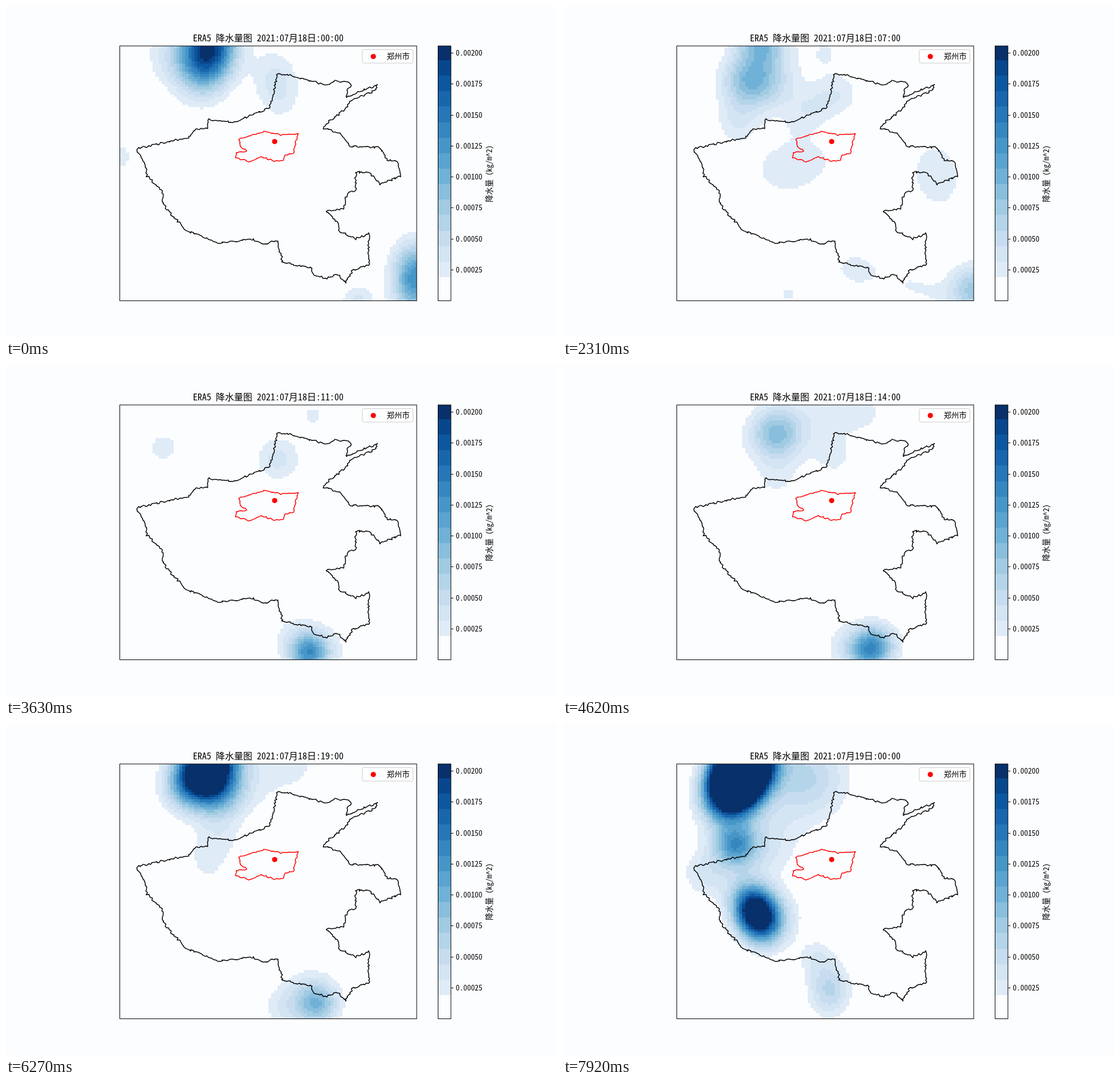
Write an HTML page with a canvas that moves like this. It is 966 by 580 pixels and loops after 8 s.

```html
<!DOCTYPE html>
<html lang="zh">
<head>
<meta charset="utf-8">
<title>ERA5 降水量图</title>
<style>
  html, body { margin: 0; width: 100%; height: 100%; overflow: hidden; background: #fcfdff; }
  canvas, svg { position: absolute; left: 0; top: 0; width: 966px; height: 580px; }
  text { font: 13.33px "Noto Sans Mono CJK SC", "Noto Sans CJK SC", "Noto Sans CJK", monospace; white-space: pre; }
  #title { font-size: 16px; }
  .mid { text-anchor: middle; }
  .frame { fill: none; stroke: #000; stroke-width: 1; }
  .border { fill: none; stroke-width: 1.5; stroke-linejoin: round; }
</style>
</head>
<body>
<canvas id="rain" width="966" height="580"></canvas>
<svg viewBox="0 0 966 580">
  <path id="province" class="border" stroke="#000"/>
  <path id="city" class="border" stroke="#f00"/>
  <circle cx="471" cy="237.5" r="4.6" fill="#f00"/>
  <rect class="frame" x="199.5" y="70" width="520.5" height="446.5"/>
  <rect class="frame" x="757.5" y="70" width="22.5" height="446.5"/>
  <rect x="624.5" y="76.5" width="89" height="23.5" rx="2.7" fill="#fff" fill-opacity=".8" stroke="#ccc"/>
  <circle cx="644" cy="88.5" r="4.6" fill="#f00"/>
  <text x="667.5" y="93">郑州市</text>
  <text id="title" class="mid" x="459.7" y="62"></text>
  <text class="mid" transform="translate(852 294) rotate(-90)">降水量 (kg/m^2)</text>
  <g id="ticks"></g>
</svg>
<script>
const $ = id => document.getElementById(id);
const ctx = $('rain').getContext('2d');
const STEP = 330, LOOP = 8000;
const MAP = { x: 200, y: 70, w: 520, h: 446, n: 100 };

// Colour bar: equal bands above a dry threshold; unit = 0.001 kg/m^2
const BAR = { base: 516.3, unit: 217.1, dry: 475, band: 27.14, count: 15 };
const BLUES = ['f7fbff', 'deebf7', 'c6dbef', '9ecae1', '6baed6', '4292c6', '2171b5', '08519c', '08306b']
  .map(hex => [0, 2, 4].map(i => parseInt(hex.slice(i, i + 2), 16)));

function blues(t) {
  const p = Math.min(t, 0.9999) * 8, i = Math.floor(p), f = p - i;
  return `rgb(${BLUES[i].map((c, k) => Math.round(c + (BLUES[i + 1][k] - c) * f))})`;
}

const bandTop = i => Math.max(MAP.y, BAR.dry - (i + 1) * BAR.band);
const colors = Array.from({ length: BAR.count }, (_, i) =>
  i === BAR.count - 1 ? blues(1) : blues((516 - bandTop(i) - BAR.band / 2) / MAP.h));

function colorOf(value) {
  const i = Math.floor((BAR.dry - BAR.base + value * BAR.unit) / BAR.band);
  return colors[Math.min(i, BAR.count - 1)];
}

// Rain cells by hour: x, y, spread, peak, then optional stretch and its tilt in degrees
const RAIN = {
  0: [[356, 75, 32, 2, 1.5, 102], [300, 85, 40, .35], [475, 137, 30, .38, 1.5, 80],
      [195, 264, 20, .3], [718, 477, 28, 1.3, 1.5, 90], [616, 518, 22, .36]],
  4: [[345, 55, 29, 2], [362, 135, 34, 1], [312, 165, 32, .5, 1.7, 100], [418, 165, 30, .25],
      [487, 157, 29, .48], [342, 347, 16, .24], [722, 497, 31, 1.9]],
  9: [[323, 128, 32, 1], [305, 205, 25, .27], [365, 82, 28, .36], [460, 80, 30, .33],
      [440, 182, 24, .36, 1.9, -38], [390, 288, 36, .45, 1.3], [448, 262, 34, .2],
      [655, 297, 35, .5, 1.4, 80], [437, 440, 25, .27], [512, 462, 37, .35], [620, 493, 23, .33, 2.2, 20],
      [395, 505, 25, .33], [196, 268, 23, .3]],
  11: [[276, 145, 31, .23], [477, 165, 30, .36], [539, 88, 25, .21], [531, 506, 24, 1.1],
       [530, 484, 30, .3, 1.6, 20]],
  17: [[373, 120, 32, 1.72], [374, 200, 31, .42], [450, 90, 47, .42], [515, 75, 28, .3],
       [547, 491, 26, 1.6], [490, 500, 29, .33]],
  21: [[349, 80, 31, 6, 1.35, -45], [350, 250, 31, .36, 1.2, 70], [536, 462, 31, .38],
       [494, 490, 33, .3]],
  24: [[311, 88, 30, 7, 1.45, -60], [425, 95, 52, .6], [302, 212, 25, 1], [340, 210, 48, .4],
       [252, 262, 32, .33], [340, 333, 26, 2.7, 1.3, 65], [388, 335, 30, .2], [467, 466, 26, .6, 1.25, 90],
       [443, 408, 23, .28]]
};

function rainField(cells) {
  const field = new Float32Array(MAP.n ** 2);
  for (const [cx, cy, spread, peak, stretch = 1, tilt = 0] of cells) {
    const c = Math.cos(tilt * Math.PI / 180), s = Math.sin(tilt * Math.PI / 180);
    for (let i = 0; i < field.length; i++) {
      const dx = MAP.x + (i % MAP.n + .5) * MAP.w / MAP.n - cx;
      const dy = MAP.y + (Math.floor(i / MAP.n) + .5) * MAP.h / MAP.n - cy;
      const u = (dx * c + dy * s) / stretch, v = dy * c - dx * s;
      field[i] += peak * Math.exp(-(u * u + v * v) / (2 * spread * spread));
    }
  }
  return field;
}

const hours = Object.keys(RAIN).map(Number);
const fields = hours.map(h => rainField(RAIN[h]));

function drawBar() {
  colors.forEach((color, i) => {
    const bottom = BAR.dry - i * BAR.band;
    ctx.fillStyle = color;
    ctx.fillRect(758, Math.round(bandTop(i)), 22, Math.round(bottom) - Math.round(bandTop(i)));
  });
}

function drawRain(hour) {
  const k = Math.max(1, hours.findIndex(h => h >= hour));
  const mix = (hour - hours[k - 1]) / (hours[k] - hours[k - 1]);
  const edge = (start, size, i) => Math.round(start + i * size / MAP.n);
  ctx.clearRect(MAP.x, MAP.y, MAP.w, MAP.h);
  for (let i = 0; i < MAP.n ** 2; i++) {
    const color = colorOf(fields[k - 1][i] * (1 - mix) + fields[k][i] * mix);
    if (!color) continue;
    const col = i % MAP.n, row = Math.floor(i / MAP.n);
    const x = edge(MAP.x, MAP.w, col), y = edge(MAP.y, MAP.h, row);
    ctx.fillStyle = color;
    ctx.fillRect(x, y, edge(MAP.x, MAP.w, col + 1) - x, edge(MAP.y, MAP.h, row + 1) - y);
  }
}

// Borders: key corners joined by seeded ragged lines
const PROVINCE = `476,119 495,121 562,139 576,131 605,135 595,160 650,138 648,147 605,166 588,187 565,203
  557,215 585,222 604,246 655,248 668,270 685,272 691,298 657,313 638,293 613,291 613,322 598,328 592,355
  562,360 583,380 583,395 613,408 636,399 636,454 608,463 595,485 583,470 560,478 538,470 537,459 485,449
  476,411 450,418 435,409 372,415 315,393 275,348 274,325 247,298 246,284 229,250 320,230 333,217 352,213
  353,199 400,204 462,178 472,140`;
const CITY = `409,233 452,220 482,226 512,224 503,259 488,262 488,269 472,272 447,264 428,273 402,266
  404,257 421,254 412,247`;

function ragged(text, amount) {
  const points = text.split(/\s+/).map(p => p.split(',').map(Number));
  let seed = 7;
  const jitter = () => ((seed = seed * 16807 % 2147483647) / 2147483647 - .5) * 2 * amount;
  const out = points.flatMap(([x, y], i) => {
    const [nx, ny] = points[(i + 1) % points.length];
    const parts = Math.ceil(Math.hypot(nx - x, ny - y) / 3);
    return Array.from({ length: parts }, (_, j) =>
      [x + (nx - x) * j / parts + jitter(), y + (ny - y) * j / parts + jitter()]);
  });
  return 'M' + out.map(p => p.map(v => v.toFixed(1))).join('L') + 'Z';
}

$('province').setAttribute('d', ragged(PROVINCE, 1.8));
$('city').setAttribute('d', ragged(CITY, 1.2));

$('ticks').innerHTML = Array.from({ length: 8 }, (_, i) => {
  const value = (i + 1) * .25, y = BAR.base - value * BAR.unit;
  return `<path d="M780 ${Math.round(y) + .5}h4.5" stroke="#000"/>` +
         `<text x="788.5" y="${y + 5}">${(value / 1000).toFixed(5)}</text>`;
}).join('');

let shown = -1;
function tick() {
  const hour = Math.floor(performance.now() % LOOP / STEP);
  if (hour !== shown) {
    shown = hour;
    const day = 18 + Math.floor(hour / 24), clock = String(hour % 24).padStart(2, '0');
    $('title').textContent = `ERA5 降水量图 2021:07月${day}日:${clock}:00`;
    drawRain(hour);
  }
  requestAnimationFrame(tick);
}

drawBar();
tick();
</script>
</body>
</html>
```
